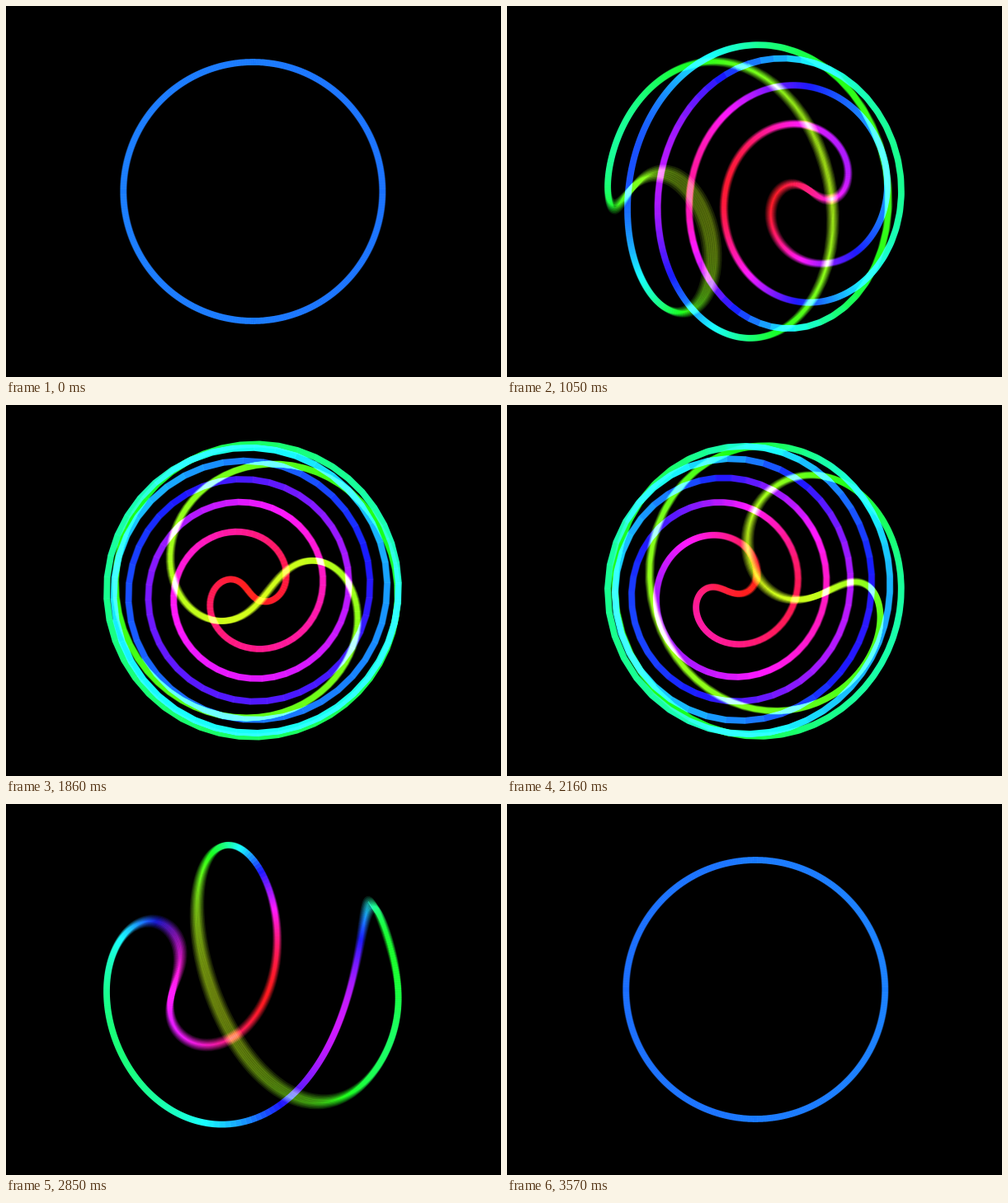
An HTML page with a canvas that plays this animation: 600x450 px, repeating every 3.6 s.

```html
<!DOCTYPE html>
<html lang="en">
<head>
<meta charset="utf-8">
<title>Twisting ring</title>
<style>
html, body { margin: 0; height: 100%; overflow: hidden; background: #000; }
canvas { display: block; }
</style>
</head>
<body>
<canvas id="stage" width="600" height="450"></canvas>
<script>
const ctx = document.getElementById('stage').getContext('2d');
const STEP = 30, STEPS = 120;          // ms per step, steps per loop
const POINTS = 480, SAMPLES = 8, SHUTTER = 0.7;
const RADIUS = 157, DEPTH = 0.473, HALF_WIDTH = 3.9;
const MAX_TWIST = 11.9, EASE_POWER = 2.75;

const ease = p => p < 0.5
  ? 0.5 * (2 * p) ** EASE_POWER
  : 1 - 0.5 * (2 - 2 * p) ** EASE_POWER;

// A unit ring twisted about its own diameter, then turned about the vertical.
function ringPoint(angle, turn, twist) {
  const along = Math.cos(angle), across = Math.sin(angle);
  const psi = twist * along;
  const side = across * Math.sin(psi);
  const x = -along * Math.cos(turn) + side * Math.sin(turn);
  const y = across * Math.cos(psi);
  const z = along * Math.sin(turn) + side * Math.cos(turn);
  const scale = RADIUS / (1 - DEPTH * z);
  return { x: 300 + x * scale, y: 225 + y * scale, z };
}

function drawRing(u) {
  const twist = MAX_TWIST * ease(1 - Math.abs(2 * u - 1));
  const pts = Array.from({ length: POINTS }, (_, i) =>
    ringPoint((i + 0.5) / POINTS * 2 * Math.PI, Math.PI * u, twist));

  pts.forEach((p, i) => {
    const a = pts[(i + POINTS - 1) % POINTS], b = pts[(i + 1) % POINTS];
    const dx = b.x - a.x, dy = b.y - a.y;
    const k = HALF_WIDTH / (Math.hypot(dx, dy) || 1);
    p.nx = -dy * k;
    p.ny = dx * k;
  });

  pts.forEach((p, i) => {
    const q = pts[(i + 1) % POINTS];
    ctx.fillStyle = `hsl(${216 - 72.5 * (p.z + q.z)}, 100%, 55%)`;
    ctx.beginPath();
    ctx.moveTo(p.x + p.nx, p.y + p.ny);
    ctx.lineTo(q.x + q.nx, q.y + q.ny);
    ctx.lineTo(q.x - q.nx, q.y - q.ny);
    ctx.lineTo(p.x - p.nx, p.y - p.ny);
    ctx.fill();
  });
}

function draw(step) {
  ctx.globalCompositeOperation = 'source-over';
  ctx.globalAlpha = 1;
  ctx.fillStyle = '#000';
  ctx.fillRect(0, 0, 600, 450);
  ctx.globalCompositeOperation = 'lighter';
  ctx.globalAlpha = 1 / SAMPLES;
  for (let i = 0; i < SAMPLES; i++) {
    drawRing((step + SHUTTER * (i + 0.5) / SAMPLES) / STEPS);
  }
}

let shown = -1;
const start = performance.now();
function tick() {
  const step = Math.floor((performance.now() - start) / STEP) % STEPS;
  if (step !== shown) draw(shown = step);
  requestAnimationFrame(tick);
}
tick();
</script>
</body>
</html>
```
